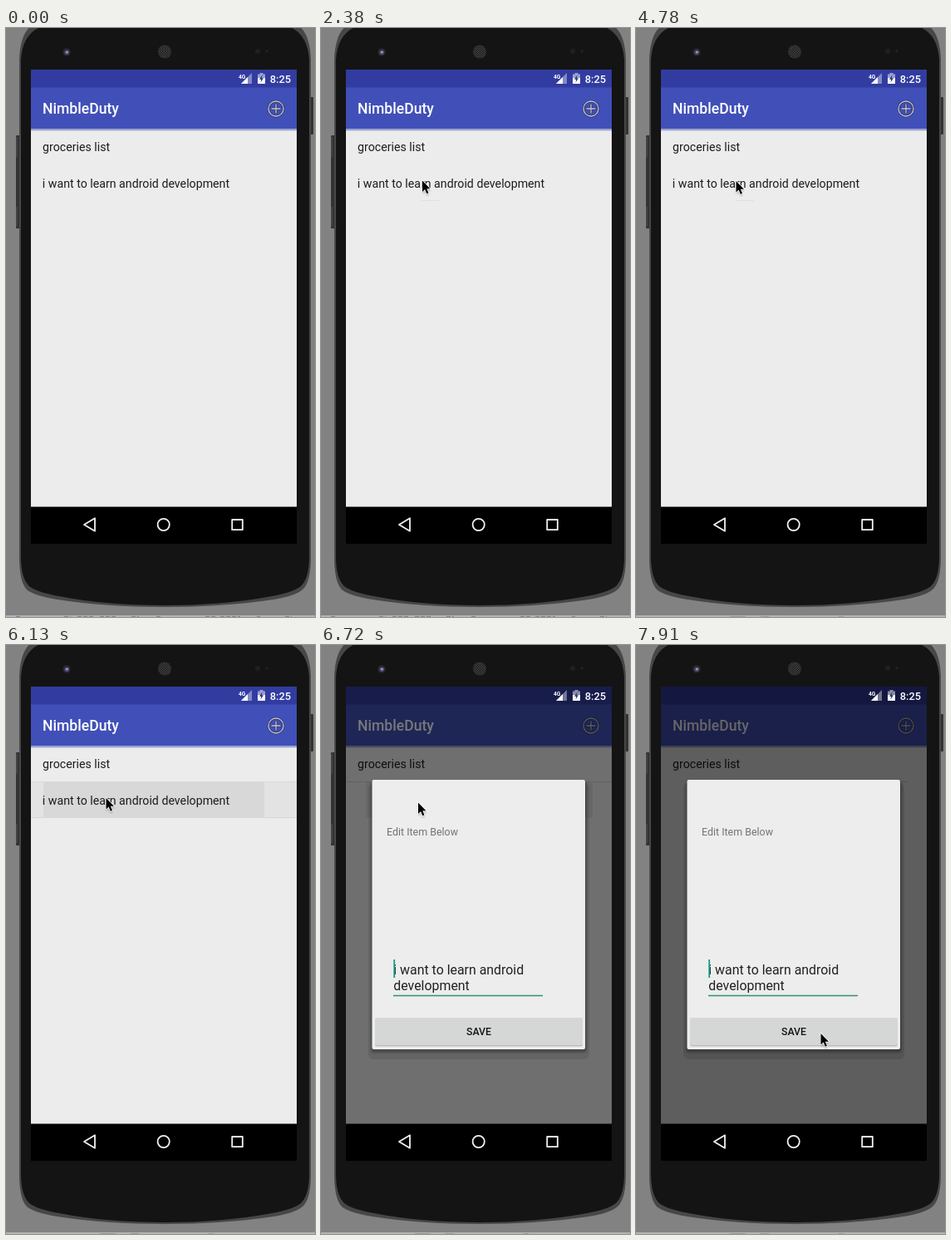
Animation, 372 px wide and 708 px high, one loop 8 s. Source, as an HTML page:

```html
<!DOCTYPE html>
<html lang="en">
<head>
<meta charset="utf-8">
<title>Todo list</title>
<style>
html, body { margin: 0; width: 100%; height: 100%; overflow: hidden; background: #828282; }
svg { display: block; width: 372px; height: 708px; font-family: Roboto, "Noto Sans", sans-serif; }
.medium { font-weight: 500; }
.list { font-size: 14.2px; fill: #1d1d1d; }
.field { font-size: 15.9px; fill: #222; }
</style>
</head>
<body>
<svg viewBox="0 0 372 708" xmlns="http://www.w3.org/2000/svg">
  <defs>
    <pattern id="mesh" width="3" height="3" patternUnits="userSpaceOnUse">
      <rect width="3" height="3" fill="#202020"/>
      <circle cx="1" cy="1" r=".8" fill="#575757"/>
      <circle cx="2.5" cy="2.5" r=".6" fill="#484848"/>
    </pattern>
    <filter id="soft" x="-50%" y="-50%" width="200%" height="200%"><feGaussianBlur stdDeviation="1"/></filter>
  </defs>

  <!-- phone: rim, then face -->
  <rect width="372" height="708" fill="#828282"/>
  <rect x="12" y="129" width="5" height="112" rx="1" fill="#333"/>
  <path d="M13 131V155M13 215V238" stroke="#555"/>
  <rect x="365" y="83" width="5" height="45" rx="1" fill="#333"/>
  <path d="M31 -3Q17 7 16 38V636Q16 664 24 674Q31 682 62 687Q120 696 191 696Q262 696 322 687Q352 682 359 673Q367 663 367 636V38Q366 7 352 -3Z" fill="#474747"/>
  <path d="M46 -3Q20 5 18 38V636Q18 660 27 670Q35 678 64 683Q120 694 191 694Q262 694 320 683Q348 678 356 670Q365 660 365 636V38Q363 5 337 -3Z" fill="#141414"/>
  <circle cx="73" cy="29" r="4.800" fill="#27272d"/>
  <circle cx="73.200" cy="29.200" r="2.800" fill="#4e4e74"/>
  <circle cx="73.400" cy="29" r="1.300" fill="#a2a2c0"/>
  <circle cx="191" cy="28.500" r="8" fill="url(#mesh)"/>
  <circle cx="303" cy="28" r="3" fill="#202020"/>
  <circle cx="314" cy="28" r="1.800" fill="#222"/>
  <rect y="706" width="372" height="2" fill="#b4b4b4"/>
  <path id="marksBefore" d="M12 707.500H19M70 707.500H78M86 707.500H107M113 707.500H134M151 707.500H160M181 707.500H188M240 707.500H252M258 707.500H282M302 707.500H306M336 707.500H344" stroke="#808080" stroke-dasharray="5 2"/>
  <path id="marksAfter" d="M113 707.500H132M150 707.500H160M244 707.500H250" stroke="#989898"/>

  <!-- app screen -->
  <rect x="30" y="50" width="320" height="526" fill="#ececec"/>
  <rect x="30" y="50" width="320" height="22" fill="#323ca0"/>
  <rect x="30" y="71.500" width="320" height="50" fill="#4150b8"/>
  <rect x="30" y="121" width="320" height="2" fill="#9aa2d4"/>
  <rect x="30" y="123" width="320" height="1" fill="#d2d3dd"/>
  <text x="44" y="103.300" font-size="17.600" class="medium" fill="#fff">NimbleDuty</text>
  <g fill="none">
    <circle cx="325" cy="97" r="9" stroke="#30366c" stroke-width="2.800"/>
    <path d="M325 91V103M319 97H331" stroke="#30366c" stroke-width="3"/>
    <circle cx="325" cy="97" r="9" stroke="#c3c5d0" stroke-width="1.300"/>
    <path d="M325 91.500V102.500M319.500 97H330.500" stroke="#c3c5d0" stroke-width="1.300"/>
  </g>
  <text x="44" y="148.200" class="list">groceries list</text>
  <path id="trace" d="M120 207.500H142" stroke="#e0e0e0"/>
  <g id="pressed">
    <rect x="30" y="164" width="320" height="44" fill="#e3e3e3"/>
    <rect x="45" y="165" width="266" height="43" rx="2" fill="#d8d8d8"/>
    <path d="M30 164.500H350M30 207.500H350" stroke="#d8d8d8"/>
  </g>
  <text id="item" x="43.800" y="191.700" class="list">i want to learn android development</text>

  <!-- dialog -->
  <g id="dialog">
    <path id="divider" stroke="#d0d0d0"/>
    <rect id="ghost" x="54" y="165" width="273" height="43" rx="3" opacity=".07"/>
    <rect id="dim" x="30" y="50" width="320" height="526"/>
    <rect x="57" y="166" width="266" height="332" rx="6" opacity=".1"/>
    <rect x="60" y="163" width="260" height="327" rx="4" opacity=".25" filter="url(#soft)"/>
    <rect x="61.500" y="162" width="256.500" height="324" rx="2" fill="#ededed"/>
    <text x="79" y="229.400" font-size="12.450" fill="#747474">Edit Item Below</text>
    <text x="87.300" y="396" class="field">i want to learn android</text>
    <text x="87.300" y="414.500" class="field">development</text>
    <path d="M87 421.500H267" stroke="#318e78" stroke-width="1.500"/>
    <path id="caret" d="M88.200 378V400" stroke="#159c85" stroke-width="1.800"/>
    <rect x="65" y="449" width="250" height="33.500" rx="2" fill="#bcbcbc"/>
    <rect x="65" y="448" width="250" height="33" rx="2" fill="#d5d7d6"/>
    <text x="190" y="469" text-anchor="middle" font-size="12.300" class="medium" fill="#161616">SAVE</text>
  </g>

  <!-- status icons -->
  <g fill="#fff">
    <text x="280" y="60.500" font-size="6.600" font-weight="700">4G</text>
    <path d="M283 67L296 54V67Z" opacity=".4"/>
    <path d="M283 67L291 59V67Z"/>
    <path d="M305.500 54H309.500V55.500H312V67H303V55.500H305.500Z" opacity=".5"/>
    <path d="M303 60H312V67H303Z"/>
    <path d="M308.500 56.500L305 61.700H307.200L306.500 65.500L310 60.300H307.800Z" fill="#28307c"/>
    <text x="317.800" y="65.800" font-size="12.800" class="medium">8:25</text>
  </g>

  <!-- navigation bar -->
  <rect x="30" y="575.500" width="320" height="44.500"/>
  <g fill="none" stroke="#f2f2f2" stroke-width="1.800" stroke-linejoin="round">
    <path d="M94 597L107 589.300V604.700Z"/>
    <circle cx="189.700" cy="597" r="7.100"/>
    <rect x="272.200" y="591" width="12.600" height="12.200"/>
  </g>

  <g id="pointer">
    <path d="M0 2V15.500L3.200 13 5.500 18 7.800 17 5.500 12H10Z" opacity=".3" filter="url(#soft)"/>
    <path d="M0 0V13.400L3.100 10.600 5.300 15.700 7.500 14.800 5.300 9.700H9.500Z" stroke="#fff" stroke-width="1.600" paint-order="stroke" stroke-linejoin="round"/>
  </g>
</svg>
<script>
const LOOP = 8000;
const CARET_OFF = 7170, CARET_ON = 7610;
const PRESS = 6130, CLEAR = 6570, OPEN = 6720, DARKEN = 6870;

// [start time, tip x, tip y]: the pointer is sampled, so it jumps
const stops = [
  [1190, 168, 510], [1340, 134, 323], [1480, 139, 292], [1930, 130, 257],
  [2080, 121, 205], [2230, 122, 189], [2380, 122, 183.5], [3580, 121, 183.5],
  [4780, 120.5, 184], [6270, 118.5, 186], [6720, 117, 189.5], [6870, 118, 239],
  [7020, 128, 306], [7170, 136, 359], [7320, 138, 388], [7470, 209, 465],
  [7610, 222, 474], [7760, 223, 474], [7910, 222.5, 467]
];

const el = id => document.getElementById(id);
const show = (id, on) => el(id).setAttribute("visibility", on ? "inherit" : "hidden");

function render(t) {
  const stop = stops.filter(s => s[0] <= t).pop();
  show("pointer", stop);
  if (stop) el("pointer").setAttribute("transform", `translate(${stop[1]} ${stop[2]})`);

  show("marksBefore", t < 4490);
  show("marksAfter", t >= 4490);
  show("trace", t >= 2080 && t < PRESS);
  show("pressed", t >= PRESS && t < OPEN);
  show("item", t < CLEAR);

  const dark = t >= DARKEN;
  show("dialog", t >= OPEN);
  show("ghost", t >= OPEN && !dark);
  show("caret", t >= OPEN && (t < CARET_OFF || t >= CARET_ON));
  el("dim").setAttribute("opacity", dark ? 0.6 : 0.53);
  el("divider").setAttribute("d", dark ? "M318 164.5H326" : "M30 164.5H350");
}

function tick() {
  render(performance.now() % LOOP);
  requestAnimationFrame(tick);
}
render(0);
requestAnimationFrame(tick);
</script>
</body>
</html>
```
